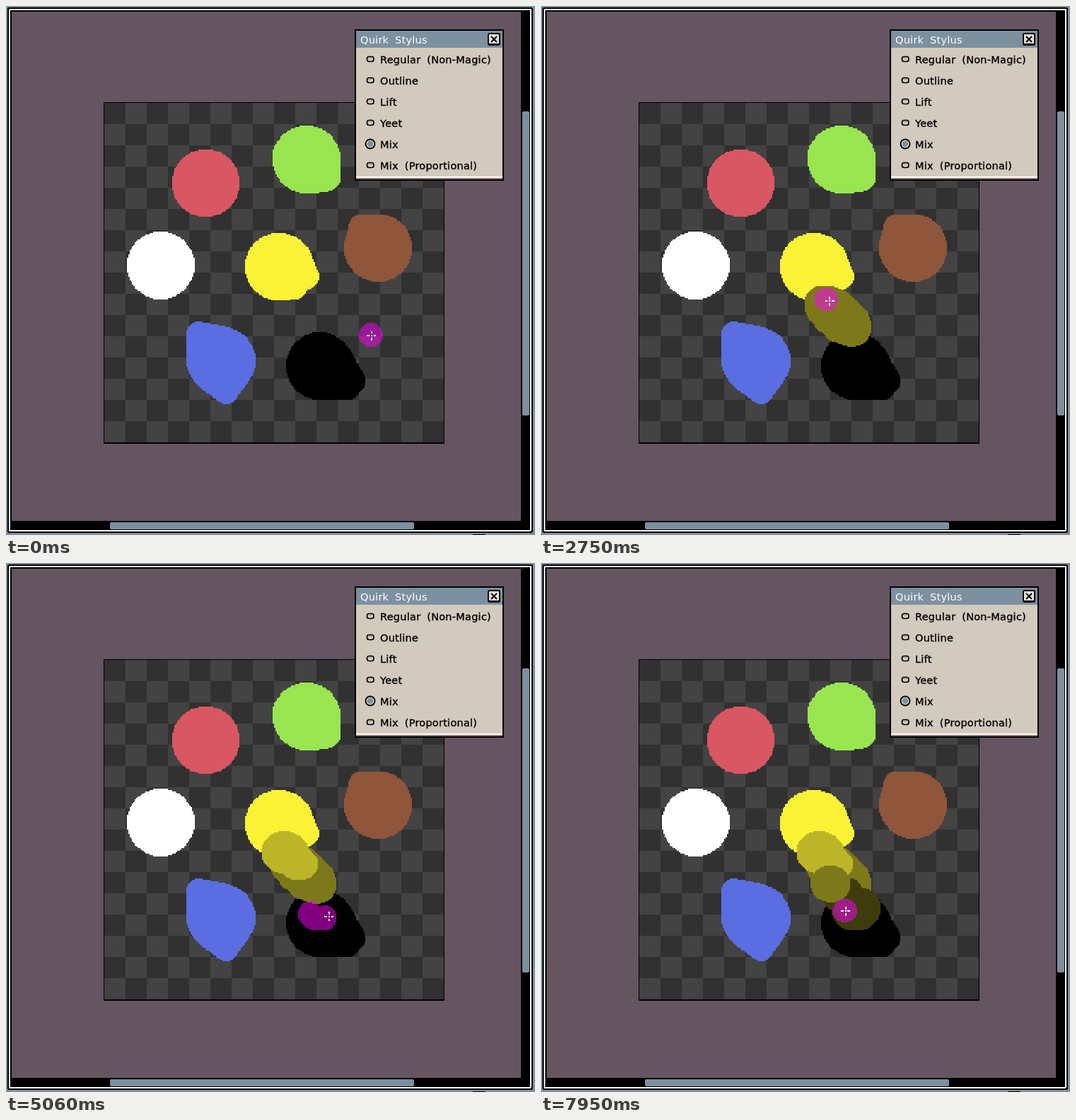
These frames come from a looping animation (748 px wide and 748 px high, 8 s). An HTML page with a canvas:

```html
<!DOCTYPE html>
<html lang="en">
<head>
<meta charset="utf-8">
<title>Mixing brush</title>
<style>
  html, body { margin: 0; width: 100%; height: 100%; overflow: hidden; background: #655561; }
  svg, canvas { position: absolute; left: 0; top: 0; }
  #paint { left: 139px; top: 137px; width: 480px; height: 480px; image-rendering: pixelated; }
  text { font: 14.5px "DejaVu Sans", sans-serif; letter-spacing: .25px; word-spacing: 4px; }
  #options text { stroke: #000; stroke-width: .35px; }
</style>
</head>
<body>
<svg width="748" height="748" shape-rendering="crispEdges">
  <rect width="748" height="748" fill="#7c909f"/>
  <rect x="2" y="2" width="743" height="743" rx="3"/>
  <rect x="4" y="4" width="739" height="739" rx="2" fill="#fff"/>
  <rect x="6" y="6" width="735" height="735"/>
  <rect x="8" y="8" width="720" height="720" fill="#655561"/>
  <rect x="730" y="149" width="10" height="430" rx="3" fill="#7c909f"/>
  <rect x="147" y="730" width="430" height="10" rx="3" fill="#7c909f"/>
  <rect x="660" y="747" width="18" height="1"/>
  <rect x="138" y="136" width="482" height="483"/>
</svg>
<canvas id="paint"></canvas>
<svg width="748" height="748">
  <g shape-rendering="crispEdges">
    <rect x="493" y="33" width="211" height="214"/>
    <rect x="495" y="35" width="207" height="24" fill="#7c909f"/>
    <rect x="495" y="59" width="207" height="182" fill="#d2cabd"/>
    <rect x="495" y="241" width="207" height="2" fill="#fff"/>
    <rect x="495" y="243" width="207" height="2" fill="#968275"/>
  </g>
  <rect x="681" y="38" width="18" height="18" rx="3"/>
  <rect x="683" y="40" width="14" height="13" rx="1" fill="#e8e2da"/>
  <path d="M686 43l8 8m0-8l-8 8" stroke="#000" stroke-width="2"/>
  <text x="501" y="53" fill="#fff">Quirk Stylus</text>
  <g id="options"></g>
</svg>
<script>
const SCALE = 480 / 256, LOOP = 8000, STEP = 60, FIRST = 560, BRUSH = 9, BLOB = 25.5;
const mixLerp = (a, b, f) => a + (b - a) * f;
const between = (p, q, f) => p.map((v, i) => mixLerp(v, q[i], f));

// Dialog options
const names = ['Regular (Non-Magic)', 'Outline', 'Lift', 'Yeet', 'Mix', 'Mix (Proportional)'];
document.getElementById('options').innerHTML = names.map((name, i) => {
  const y = 75 + i * 30;
  const mark = name === 'Mix'
    ? `<circle cx="515" cy="${y}" r="7.5"/><circle cx="515" cy="${y}" r="4.8" fill="#7c909f" stroke="#d2cabd" stroke-width="1.6"/>`
    : `<rect x="510.5" y="${y - 3.5}" width="9.5" height="7" rx="3" fill="#d2cabd" stroke="#000" stroke-width="1.7"/><path d="M512 ${y - 2}h6" stroke="#968275" stroke-width="1.5"/>`;
  return `${mark}<text x="529" y="${y + 6}">${name}</text>`;
}).join('');

// Paint blobs: colour, centre, then points the edge bulges towards
const blobs = [
  ['#d95763', [282, 251]],
  ['#99e550', [425, 217], [394, 208], [455, 244]],
  ['#ffffff', [219, 366]],
  ['#fbf236', [386, 368], [425, 383], [408, 398]],
  ['#8f563b', [527, 343], [502, 312]],
  ['#5b6ee1', [304, 501], [272, 464], [311, 545]],
  ['#000000', [444, 509], [491, 530], [484, 540]],
];

// The pen circles once round a tilted ellipse for each stroke and moves straight between stops
const stroke = (start, end, colour, x, y, a, b, tilt, phase) => ({ start, end, colour, x, y, a, b, tilt, phase });
const stop = (t, x, y) => stroke(t, t, null, x, y, 0, 0, 0, 0);
const HALF = '#7d791b', LIGHT = '#bcb528', DARK = '#3e3c0d';
const moves = [
  stop(0, 515, 466), stop(500, 515, 466), stop(620, 512, 485), stop(1220, 404, 399),
  stroke(1580, 2240, HALF, 420, 438, 36, 17, .68, 2.9),
  stop(2720, 404, 414),
  stroke(2790, 3300, LIGHT, 395, 409.5, 17, 13, .2, .5),
  stop(3600, 427, 427), stop(3840, 421, 424),
  stroke(4100, 4400, LIGHT, 414, 426, 10, 5, 0, -.4),
  stop(4640, 474, 485), stop(4740, 460, 506),
  stroke(4880, 5600, DARK, 446, 489.5, 18, 13, -.2, 3),
  stop(5900, 453, 517),
  stroke(6260, 6620, DARK, 427, 469, 11, 2, -.5, 3.1),
  stop(6840, 460, 519), stop(7040, 459, 490),
  stroke(7340, 7760, HALF, 409.5, 453.5, 11, 9, 0, 3),
  stop(7940, 429, 491), stop(LOOP, 431, 492),
];

const makeLayer = canvas => {
  canvas.width = canvas.height = 256;
  return canvas.getContext('2d', { willReadFrequently: true });
};
const paint = makeLayer(document.getElementById('paint'));
const mask = makeLayer(document.createElement('canvas'));
const base = makeLayer(document.createElement('canvas'));

const toPixel = ([x, y]) => [(x - 139) / SCALE, (y - 137) / SCALE];

// Hard-edged disc, centred on a pixel or a pixel corner to suit its diameter
function disc(ctx, point, r) {
  const odd = Math.round(r * 2) % 2;
  const [u, v] = toPixel(point).map(c => odd ? Math.floor(c) + .5 : Math.round(c));
  for (let j = Math.floor(v - r); j <= v + r; j++) {
    const dy = j + .5 - v;
    if (Math.abs(dy) >= r) continue;
    const w = Math.sqrt(r * r - dy * dy), left = Math.round(u - w);
    ctx.fillRect(left, j, Math.round(u + w) - left, 1);
  }
}

function orbit({ x, y, a, b, tilt, phase }, turn) {
  const angle = phase - turn * 2 * Math.PI;
  const u = a * Math.cos(angle), v = b * Math.sin(angle);
  const c = Math.cos(tilt), s = Math.sin(tilt);
  return [x + u * c - v * s, y + u * s + v * c];
}

function cursor(t) {
  const next = moves.findIndex(m => m.start > t);
  if (next < 0) return orbit(moves[moves.length - 1], 1);
  const from = moves[next - 1], to = moves[next];
  if (t < from.end) return orbit(from, (t - from.start) / (from.end - from.start));
  return between(orbit(from, 1), orbit(to, 0), (t - from.end) / (to.start - from.end));
}

function trail(ctx, from, to) {
  for (let t = from; t < to; t += 8) disc(ctx, cursor(t), BRUSH);
}

function crosshair(point) {
  const [x, y] = toPixel(point).map(Math.round);
  const [r, g, b] = paint.getImageData(x, y, 1, 1).data;
  paint.fillStyle = .3 * r + .59 * g + .11 * b > 124 ? '#000' : '#fff';
  paint.fillRect(x, y, 1, 1);
  for (const d of [-3, 2]) {
    paint.fillRect(x + d, y, 2, 1);
    paint.fillRect(x, y + d, 1, 2);
  }
}

for (let i = 0; i < 256; i++) {
  const col = i % 16, row = i >> 4;
  base.fillStyle = (col + row) % 2 ? '#434343' : '#313131';
  base.fillRect(col * 16, row * 16, 16, 16);
}
for (const [colour, centre, ...bulges] of blobs) {
  base.fillStyle = colour;
  disc(base, centre, BLOB);
  for (const p of bulges) {
    for (let f = 0; f <= 1; f += 1 / 32) disc(base, between(centre, p, f), mixLerp(BLOB, BRUSH, f));
  }
}

function draw(now) {
  const time = now % LOOP;
  const t = time < FIRST ? 0 : FIRST + Math.floor((time - FIRST) / STEP) * STEP;
  paint.drawImage(base.canvas, 0, 0);
  mask.clearRect(0, 0, 256, 256);
  mask.fillStyle = '#f0f';
  for (const { start, end, colour } of moves) {
    if (!colour || t < start) continue;
    if (t < end) {
      trail(mask, start, t);
    } else {
      paint.fillStyle = colour;
      trail(paint, start, end);
    }
  }
  disc(mask, cursor(t), BRUSH);
  paint.globalAlpha = .5;
  paint.drawImage(mask.canvas, 0, 0);
  paint.globalAlpha = 1;
  crosshair(cursor(t + 40));
  requestAnimationFrame(draw);
}
requestAnimationFrame(draw);
</script>
</body>
</html>
```
